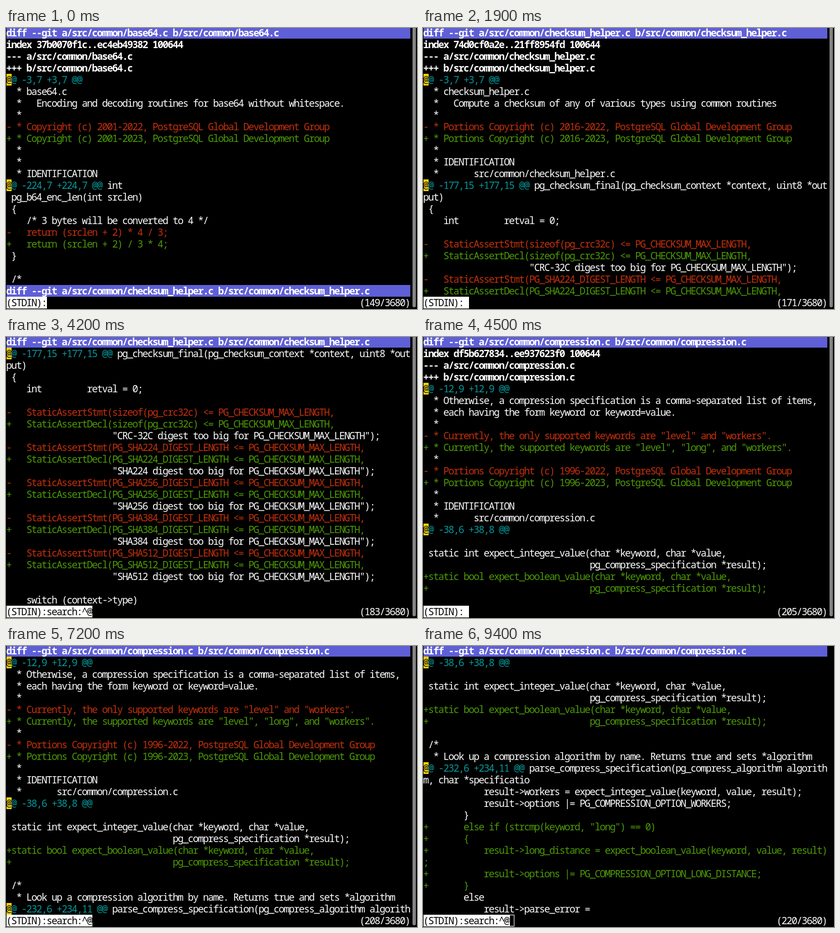
An HTML page that plays this animation: 733 by 503 pixels, repeating every 9500 ms.

```html
<!DOCTYPE html>
<html lang="en">
<head>
<meta charset="utf-8">
<title>Diff in a pager</title>
<style>
html, body { margin: 0; width: 100%; height: 100%; overflow: hidden; background: #000; }
#screen {
  position: absolute; left: 1px; top: -2px; width: 720px;
  font: 17.5px/21px "Noto Sans Mono", "DejaVu Sans Mono", monospace;
  font-stretch: 87.5%; font-variant-ligatures: none;
  color: #fff; white-space: pre;
}
#screen div { height: 21px; background: no-repeat 0 0 / 9px 21px; }
#screen .file { background: #5f5fd7; font-weight: bold; }
.meta { font-weight: bold; }
.del { color: #c4300c; }
.add { color: #4e9a06; }
.hunk { background-image: linear-gradient(#fcd20c, #fcd20c) !important; }
.hunk b, .prompt b { color: #000; font-weight: normal; }
.hunk i { color: #06989a; font-style: normal; }
.prompt { background-image: linear-gradient(#fff, #fff) !important; }
#bar {
  position: absolute; left: 725px; top: 0; width: 6px; height: 500px;
  background: #858585; border-radius: 0 0 3px 3px;
}
#hollow {
  position: absolute; top: 481px; width: 9px; height: 21px;
  box-sizing: border-box; border: 1px solid #fff;
}
</style>
</head>
<body>
<div id="screen"></div>
<div id="bar"></div>
<div id="hollow"></div>
<script>
const FIRST = 149, COLS = 80, ROWS = 23, CELL = 9, LOOP = 9500, BLUR = 9400;

const diff = `diff --git a/src/common/base64.c b/src/common/base64.c
index 37b0070f1c..ec4eb49382 100644
--- a/src/common/base64.c
+++ b/src/common/base64.c
@@ -3,7 +3,7 @@
  * base64.c
  *   Encoding and decoding routines for base64 without whitespace.
  *
- * Copyright (c) 2001-2022, PostgreSQL Global Development Group
+ * Copyright (c) 2001-2023, PostgreSQL Global Development Group
  *
  *
  * IDENTIFICATION
@@ -224,7 +224,7 @@ int
 pg_b64_enc_len(int srclen)
 {
    /* 3 bytes will be converted to 4 */
-   return (srclen + 2) * 4 / 3;
+   return (srclen + 2) / 3 * 4;
 }

 /*
diff --git a/src/common/checksum_helper.c b/src/common/checksum_helper.c
index 74d0cf0a2e..21ff8954fd 100644
--- a/src/common/checksum_helper.c
+++ b/src/common/checksum_helper.c
@@ -3,7 +3,7 @@
  * checksum_helper.c
  *   Compute a checksum of any of various types using common routines
  *
- * Portions Copyright (c) 2016-2022, PostgreSQL Global Development Group
+ * Portions Copyright (c) 2016-2023, PostgreSQL Global Development Group
  *
  * IDENTIFICATION
  *       src/common/checksum_helper.c
@@ -177,15 +177,15 @@ pg_checksum_final(pg_checksum_context *context, uint8 *output)
 {
    int         retval = 0;

-   StaticAssertStmt(sizeof(pg_crc32c) <= PG_CHECKSUM_MAX_LENGTH,
+   StaticAssertDecl(sizeof(pg_crc32c) <= PG_CHECKSUM_MAX_LENGTH,
                     "CRC-32C digest too big for PG_CHECKSUM_MAX_LENGTH");
${["SHA224", "SHA256", "SHA384", "SHA512"].map(sha =>
`-   StaticAssertStmt(PG_${sha}_DIGEST_LENGTH <= PG_CHECKSUM_MAX_LENGTH,
+   StaticAssertDecl(PG_${sha}_DIGEST_LENGTH <= PG_CHECKSUM_MAX_LENGTH,
                     "${sha} digest too big for PG_CHECKSUM_MAX_LENGTH");`).join("\n")}

    switch (context->type)
diff --git a/src/common/compression.c b/src/common/compression.c
index df5b627834..ee937623f0 100644
--- a/src/common/compression.c
+++ b/src/common/compression.c
@@ -12,9 +12,9 @@
  * Otherwise, a compression specification is a comma-separated list of items,
  * each having the form keyword or keyword=value.
  *
- * Currently, the only supported keywords are "level" and "workers".
+ * Currently, the supported keywords are "level", "long", and "workers".
  *
- * Portions Copyright (c) 1996-2022, PostgreSQL Global Development Group
+ * Portions Copyright (c) 1996-2023, PostgreSQL Global Development Group
  *
  * IDENTIFICATION
  *       src/common/compression.c
@@ -38,6 +38,8 @@

 static int expect_integer_value(char *keyword, char *value,
                                 pg_compress_specification *result);
+static bool expect_boolean_value(char *keyword, char *value,
+                                pg_compress_specification *result);

 /*
  * Look up a compression algorithm by name. Returns true and sets *algorithm
@@ -232,6 +234,11 @@ parse_compress_specification(pg_compress_algorithm algorithm, char *specificatio
            result->workers = expect_integer_value(keyword, value, result);
            result->options |= PG_COMPRESSION_OPTION_WORKERS;
        }
+       else if (strcmp(keyword, "long") == 0)
+       {
+           result->long_distance = expect_boolean_value(keyword, value, result);
+           result->options |= PG_COMPRESSION_OPTION_LONG_DISTANCE;
+       }
        else
            result->parse_error =`.split("\n");

// [start in ms, top line, prompt]
const idle = "(STDIN):", search = idle + "search:^@";
const views = [
  [0, 149, idle], [700, 171, idle], [2300, 174, search], [3600, 183, search],
  [4500, 205, idle], [6700, 208, search], [7500, 220, search]
];
const blinks = [300, 1300, 1900, 2800, 3400, 4200, 4500, 5100,
  5700, 6300, 6600, 7200, 7400, 8000, 8600, 9200];

const $ = id => document.getElementById(id);
const screen = $("screen"), bar = $("bar"), hollow = $("hollow");
const esc = s => s.replace(/&/g, "&amp;").replace(/</g, "&lt;");
const row = (cls, html, style = "") => `<div class="${cls}" style="${style}">${html}</div>`;

function kind(line) {
  if (line.startsWith("diff ")) return "file";
  if (/^(index |--- |\+\+\+ )/.test(line)) return "meta";
  return { "-": "del", "+": "add", "@": "hunk" }[line[0]] || "";
}

// One diff line as one or more screen rows
function wrap(line) {
  const cls = kind(line), parts = line.match(/.{1,80}/g) || [""];
  return parts.map((part, i) => {
    if (cls != "hunk") return row(cls, esc(part));
    if (i) return row("", esc(part));
    const [, at, range, rest] = part.match(/^(@)(@.*?@@)(.*)$/);
    return row(cls, `<b>${at}</b><i>${range}</i>${esc(rest)}`);
  });
}

function render(top, prompt, on) {
  const n = top - FIRST;
  const header = diff.slice(0, n + 1).filter(l => kind(l) == "file").pop();
  const rows = [header, ...diff.slice(n + 1)].flatMap(wrap).slice(0, ROWS);
  const status = `(${top}/3680)`;
  const gap = " ".repeat(COLS - prompt.length - status.length);
  const width = (prompt.length + on) * CELL;
  screen.innerHTML = rows.join("") +
    row("prompt", `<b>${prompt}</b>${gap}${status}`, `background-size:${width}px 21px`);
}

// Fit the font's advance to the cell grid
const probe = document.createElement("span");
probe.textContent = "x".repeat(COLS);
screen.append(probe);
const spacing = CELL - probe.getBoundingClientRect().width / COLS;
screen.style.letterSpacing = spacing + "px";
screen.style.textIndent = spacing / 2 + "px";

let shown;
function draw(t) {
  const [, top, prompt] = views.filter(v => v[0] <= t).pop();
  const on = blinks.filter(b => b <= t).length % 2;
  const focused = t < BLUR;
  const state = [top, on, focused].join();
  if (state == shown) return;
  shown = state;
  render(top, prompt, on);
  bar.hidden = hollow.hidden = false;
  bar.style.display = focused ? "block" : "none";
  hollow.style.display = focused ? "none" : "block";
  hollow.style.left = 1 + prompt.length * CELL + "px";
}

const start = performance.now();
function tick() {
  draw((performance.now() - start) % LOOP);
  requestAnimationFrame(tick);
}
tick();
</script>
</body>
</html>
```
